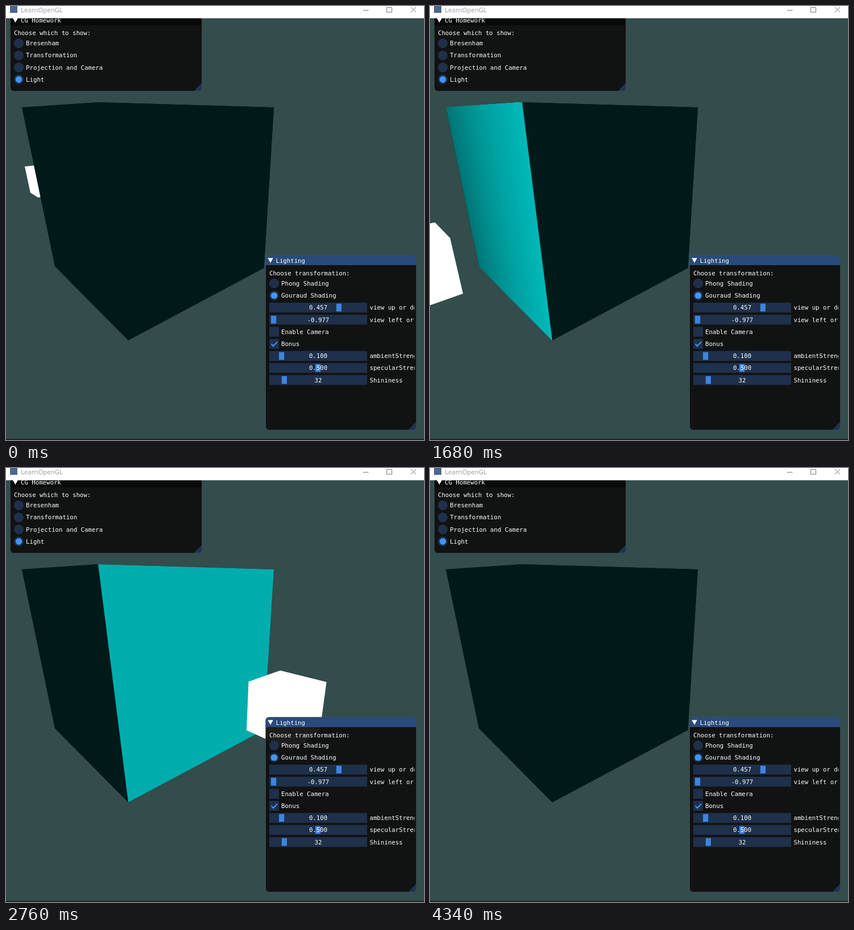
These frames come from a looping animation (735x762 px, 4490 ms). An HTML page with a canvas:

```html
<!DOCTYPE html>
<html lang="en">
<head>
<meta charset="utf-8">
<title>Lighting</title>
<style>
html, body { margin: 0; width: 100%; height: 100%; overflow: hidden; background: #334c4c; }
canvas, svg { position: absolute; left: 0; top: 0; width: 735px; height: 762px; }
text { font: 10.7px "DejaVu Sans Mono", monospace; fill: #fff; white-space: pre; }
.caption { font: 11.4px "Open Sans", sans-serif; fill: #999; }
.panel { fill: rgba(15, 15, 15, .94); }
.border { fill: none; stroke: rgba(110, 110, 128, .35); }
.field { fill: #1e304a; }
.grab { fill: #3d85e0; }
.mark { fill: #4296fa; }
.grip { fill: #1e3552; }
.line { fill: none; stroke: #777; }
</style>
</head>
<body>
<canvas width="735" height="762"></canvas>
<svg viewBox="0 0 735 762"></svg>
<script>
const LOOP = 4490;

// Picture updates: first time, last time, number of steps
const UPDATES = [
  [0, 0, 1], [70, 590, 8], [640, 640, 1], [820, 820, 1], [1050, 1050, 1], [1250, 1250, 1],
  [1440, 1960, 7], [2040, 2500, 7], [2620, 3080, 7], [3190, 3660, 8], [3720, 3870, 3], [4020, 4340, 6]
];
const times = UPDATES.flatMap(([first, last, count]) =>
  Array.from({ length: count }, (_, i) => first + (count > 1 ? (last - first) * i / (count - 1) : 0)));

// Orbit of the lamp: time, angle in degrees
const ORBIT = [[0, 19.7], [420, 47.7], [1960, 135.3], [2760, 179.5], [3660, 232.4], [3870, 249.5], [4340, 274.5]];

function orbitAngle(t) {
  const i = Math.max(1, ORBIT.findIndex(([time]) => time >= t));
  const [t0, a0] = ORBIT[i - 1], [t1, a1] = ORBIT[i];
  return a0 + (a1 - a0) * (t - t0) / (t1 - t0);
}

function lampPosition(degrees) {
  const a = degrees * Math.PI / 180;
  return { x: -Math.sin(a), z: -Math.cos(a) };
}

// Perspective camera
const eye = { x: -0.977, y: 0.457, z: 1.554 };
const yaw = 46.06 * Math.PI / 180, pitch = 20 * Math.PI / 180;

function project(x, y, z) {
  const dx = x - eye.x, dy = y - eye.y, dz = z - eye.z;
  const ahead = dx * Math.cos(yaw) - dz * Math.sin(yaw);
  const right = dx * Math.sin(yaw) + dz * Math.cos(yaw);
  const depth = ahead * Math.cos(pitch) - dy * Math.sin(pitch);
  const up = dy * Math.cos(pitch) + ahead * Math.sin(pitch);
  return [366 + 526 * right / depth, 383.5 - 526 * up / depth];
}

// Big cube edges: screen x, y and depth of the top and bottom corner
const edges = {
  left: [[28, 178, 1.686], [86, 457, 2.028]],
  near: [[162, 169, 1.01], [215, 587, 1.352]],
  right: [[471, 178, 1.662], [453.5, 460, 2.004]]
};

const ctx = document.querySelector("canvas").getContext("2d");

function polygon(points, color) {
  ctx.fillStyle = color;
  ctx.beginPath();
  points.forEach(([x, y]) => ctx.lineTo(x, y));
  ctx.fill();
}

function between(p, q, u) {
  const wp = (1 - u) * p[2], wq = u * q[2];
  return [0, 1].map(k => (p[k] * wp + q[k] * wq) / (wp + wq));
}

// Ambient plus diffuse light at a corner: offset along the normal, offset along the face
const shade = (normal, side) => 0.1 + Math.max(0, normal) / Math.hypot(normal, 0.5, side);

function drawFace(from, to, start, end) {
  const strips = Math.abs(start - end) < 0.004 ? 1 : 80;
  for (let i = 0; i < strips; i++) {
    const level = start + (end - start) * (i + 0.5) / strips;
    const c = Math.round(255 * Math.min(1, level));
    const u = i / strips;
    polygon([between(from[0], to[0], u), to[0], to[1], between(from[1], to[1], u)], `rgb(0,${c},${c})`);
  }
}

function drawCube(leftLamp, rightLamp) {
  const { left, near, right } = edges;
  polygon([left[0], near[0], right[0], right[1], near[1], left[1]], "#001a1a");
  drawFace(left, near, shade(-0.5 - leftLamp.x, leftLamp.z + 0.5), shade(-0.5 - leftLamp.x, leftLamp.z - 0.5));
  drawFace(near, right, shade(rightLamp.z - 0.5, rightLamp.x + 0.5), shade(rightLamp.z - 0.5, rightLamp.x - 0.5));
}

function drawLamp({ x, z }) {
  const corner = (sx, sy, sz) => project(x + sx * 0.1, sy * 0.1, z + sz * 0.1);
  polygon([
    corner(-1, 1, -1), corner(1, 1, -1), corner(1, 1, 1),
    corner(1, -1, 1), corner(-1, -1, 1), corner(-1, -1, -1)
  ], "#fff");
}

function draw(time) {
  const t = times.filter(step => step <= time + 0.5).pop();
  const angle = orbitAngle(t);
  const lamp = lampPosition(angle);
  const evenlyLit = t > 2499 && t < 3189;
  const behind = angle < 100 || angle > 240;
  ctx.fillStyle = "#334c4c";
  ctx.fillRect(0, 0, 735, 762);
  if (behind) drawLamp(lamp);
  drawCube(lamp, evenlyLit ? lampPosition(180) : lamp);
  if (!behind) drawLamp(lamp);
}

// Interface
const rect = (x, y, w, h, cls, rx = 0) => `<rect x="${x}" y="${y}" width="${w}" height="${h}" rx="${rx}" class="${cls}"/>`;
const path = (d, attrs) => `<path d="${d}" ${attrs}/>`;
const label = (x, y, s, attrs = "") => `<text x="${x}" y="${y}" ${attrs}>${s}</text>`;
const circle = (x, y, r, cls) => `<circle cx="${x}" cy="${y}" r="${r}" class="${cls}"/>`;
const arrow = (x, y) => path(`M${x} ${y}h9.6l-4.8 8.4z`, 'fill="#fff"');
const grip = (x, y) => path(`M${x} ${y}v-14.5l-14.5 14.5h9q5.5 0 5.5-5.5z`, 'class="grip"');
const radio = (x, y, s, on) =>
  circle(x, y, 8.6, "field") + (on ? circle(x, y, 5.7, "mark") : "") + label(x + 12.6, y + 3.8, s);
const check = (y, s, on) =>
  rect(463, y - 8.7, 17, 17.4, "field") + label(484, y + 3.8, s) +
  (on ? path(`M466.5 ${y}l3.6 3.8l7-7.4`, 'fill="none" stroke="#4296fa" stroke-width="2"') : "");
const slider = (y, value, grab, s) =>
  rect(463, y - 8.7, 172, 17.4, "field") + rect(grab, y - 6.8, 9.2, 13.6, "grab") +
  label(549, y + 3.8, value, 'text-anchor="middle"') + label(639.5, y + 3.8, s, 'clip-path="url(#inner)"');

const menu =
  rect(7.5, 16, 337, 133.5, "panel", 6) +
  path("M8 20h336v14h-336z", 'fill="#0a0a0a"') +
  arrow(11.7, 20.8) + label(26, 28.7, "CG Homework") +
  label(14, 50.7, "Choose which to show:") +
  ["Bresenham", "Transformation", "Projection and Camera", "Light"]
    .map((s, i) => radio(22.5, 65.5 + i * 21.15, s, i === 3)).join("") +
  grip(344.5, 149.5) + rect(7.5, 16, 337, 133.5, "border", 6);

const lighting =
  rect(456.5, 437.5, 265, 307, "panel", 6) +
  path("M456.5 455v-11.5q0-6 6-6h253q6 0 6 6v11.5z", 'fill="#294a7a"') +
  arrow(460.2, 442.6) + label(474.5, 450.7, "Lighting") +
  label(463, 472.5, "Choose transformation:") +
  radio(471.5, 487.2, "Phong Shading") + radio(471.5, 508.4, "Gouraud Shading", true) +
  slider(529.5, "0.457", 580.8, "view up or down") +
  slider(550.7, "-0.977", 466, "view left or right") +
  check(572, "Enable Camera") + check(593.2, "Bonus", true) +
  slider(614.4, "0.100", 480, "ambientStrength") +
  slider(635.5, "0.500", 544, "specularStrength") +
  slider(656.7, "32", 484.8, "Shininess") +
  grip(721.5, 744.5) + rect(456.5, 437.5, 265, 307, "border", 6);

const frame =
  path("M0 0h735v21.5h-735z", 'fill="#fff"') +
  path("M7 0h13v12h-13z", 'fill="#4f658c"') +
  label(26, 11, "LearnOpenGL", 'class="caption"') +
  path("M628 7.5h9.5M669.5 2.5h9v8.500h-9zM712 2l9 9m0-9l-9 9", 'class="line"') +
  path("M0 760h735v2h-735z", 'fill="#202326"');

document.querySelector("svg").innerHTML =
  '<defs><clipPath id="inner"><rect x="460" y="456" width="258.500" height="285"/></clipPath></defs>' +
  menu + lighting + frame;

const began = performance.now();
function tick() {
  draw((performance.now() - began) % LOOP);
  requestAnimationFrame(tick);
}
tick();
</script>
</body>
</html>
```
